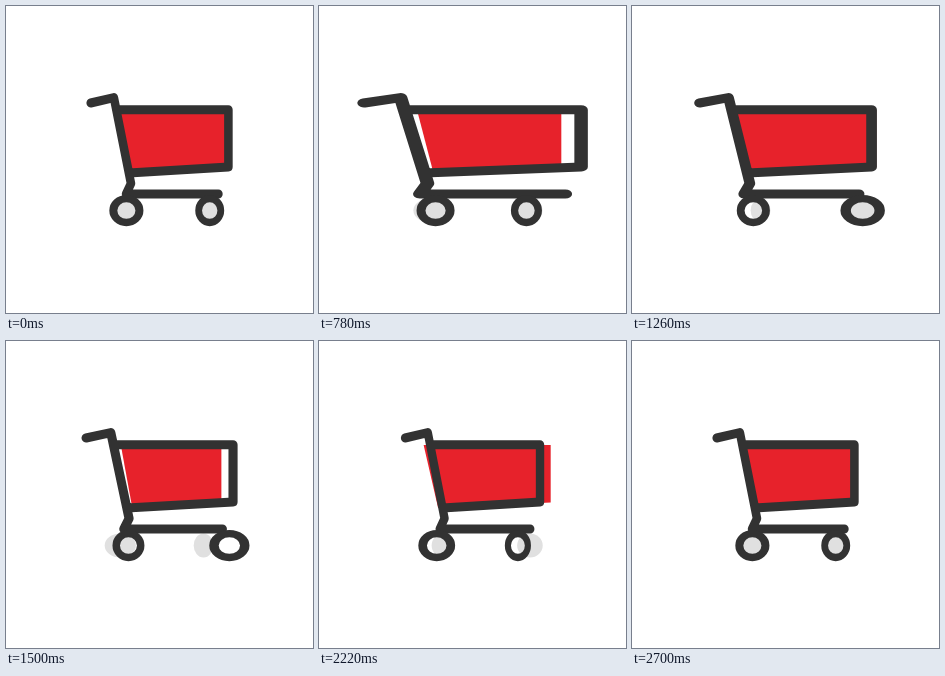
Animation, 307 px wide and 307 px high, one loop 2.76 s. Source, as an HTML page:

```html
<!DOCTYPE html>
<html lang="en">
<head>
<meta charset="utf-8">
<title>Wobbling cart</title>
<style>
  html, body { margin: 0; width: 100%; height: 100%; overflow: hidden; background: #fff; }
  svg { display: block; width: 100vw; height: 100vh; }
  .line { fill: none; stroke: #323232; stroke-width: 9; stroke-linecap: round; stroke-linejoin: round; }
  .tyre { fill: none; stroke: #323232; stroke-width: 7.3; }
  .hub { fill: #e0e0e0; }
  .basket { fill: #e7222b; }
</style>
</head>
<body>
<!-- x = 0 is the middle of the stage; every part stretches about it -->
<svg viewBox="-153.5 0 307 307">
  <circle class="hub" data-delay="150" cx="-30.2" cy="204.6" r="12"/>
  <circle class="hub" data-delay="450" cx="54" cy="204.6" r="12"/>
  <path class="basket" data-delay="-140" d="M-45.5 104H72.8V161.5L-32 167Z"/>
  <path class="line" data-delay="0" d="M-72.4 97L-48 91.6L-30 177.5L-35.2 188H62M-45.5 103.8H72.5V161L-32.2 167"/>
  <circle class="tyre" data-delay="300" cx="-30.2" cy="204.6" r="11.9"/>
  <circle class="tyre" data-delay="600" cx="54" cy="204.6" r="11.9"/>
</svg>
<script>
  const STEP = 60, LOOP = 2760, PERIOD = 2700;

  // [time in ms, horizontal scale] of the spring, eased between keys
  const keys = [
    [200, 1], [803, 1.5], [1073, 0.8], [1343, 1.3], [1613, 0.84],
    [1883, 1.2], [2153, 0.9], [2420, 1.1], [2690, 0.95], [2900, 1]
  ];
  const parts = [...document.querySelectorAll('[data-delay]')];
  const smooth = u => u * u * (3 - 2 * u);

  function stretch(time) {
    const start = keys[0][0];
    const t = ((time - start) % PERIOD + PERIOD) % PERIOD + start;
    const i = keys.findIndex(key => key[0] > t);
    const [t0, a] = keys[i - 1], [t1, b] = keys[i];
    return a + (b - a) * smooth((t - t0) / (t1 - t0));
  }

  function draw() {
    const time = Math.floor(performance.now() % LOOP / STEP) * STEP;
    for (const part of parts) {
      part.setAttribute('transform', `scale(${stretch(time - part.dataset.delay)} 1)`);
    }
    requestAnimationFrame(draw);
  }
  draw();
</script>
</body>
</html>
```
